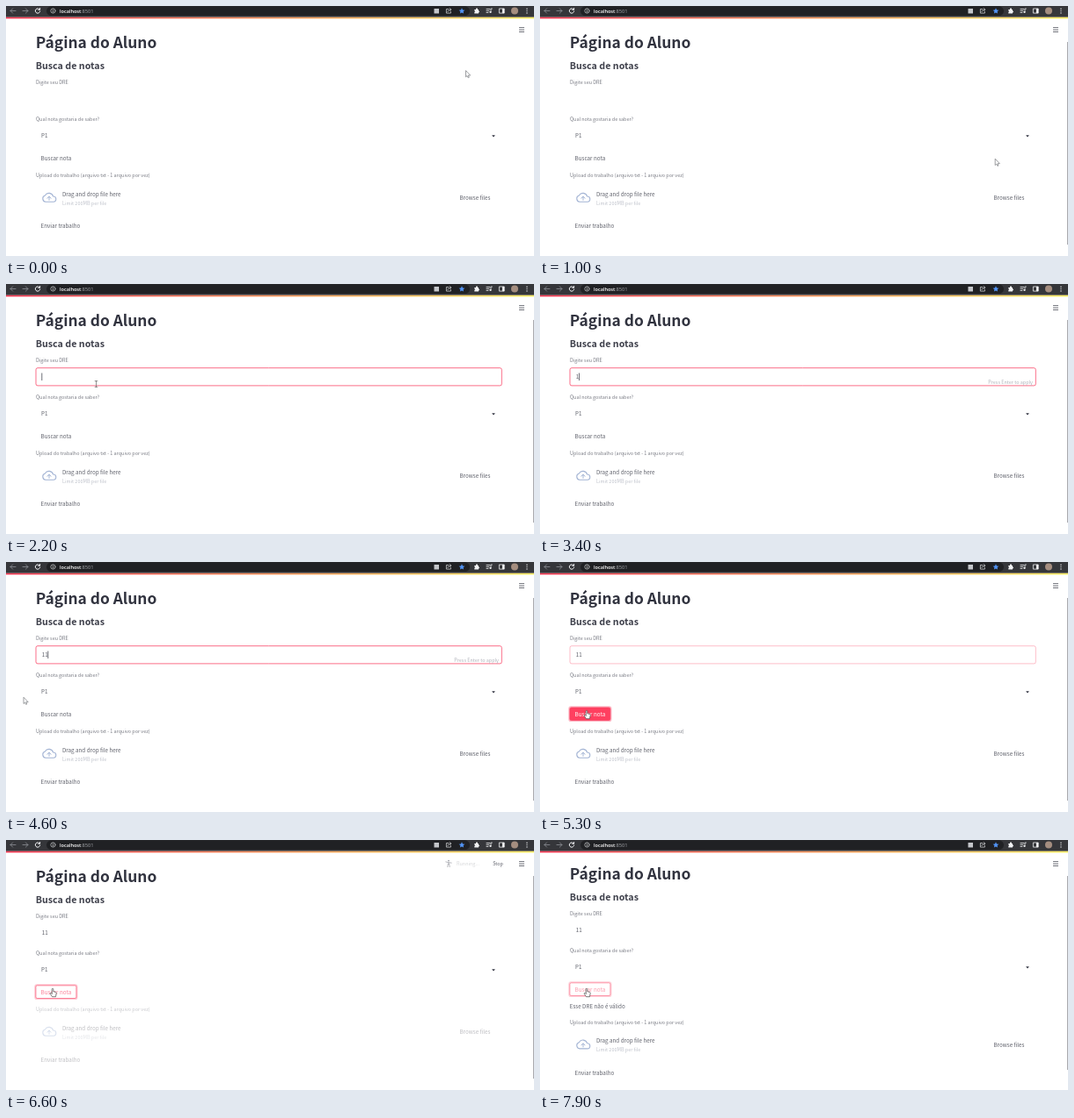
An HTML page with a canvas for the animation above (8000 ms loop, 600 by 285 pixels).

```html
<!DOCTYPE html>
<html lang="pt">
<head>
<meta charset="utf-8">
<title>Página do Aluno</title>
<style>
html, body { margin: 0; width: 100%; height: 100%; overflow: hidden; background: #fff; }
canvas { display: block; width: 600px; height: 285px; }
</style>
</head>
<body>
<canvas id="stage" width="600" height="285"></canvas>
<script>
const ctx = document.getElementById('stage').getContext('2d');
const LOOP = 8000, STEP = 100;
const ZOOM = 0.4375;          // page pixels to stage pixels
const EM = 1 / 1.117;         // the font's Latin letters are drawn large
const SANS = '"Noto Sans CJK JP", "Noto Sans CJK SC", "Noto Sans CJK", "Open Sans", sans-serif';
const BAR_FONT = '"Open Sans", "Noto Sans", sans-serif';
const INK = '#31333f', BODY = '#5d5f69', LABEL = '#787a83', RED = '#fa3e60';

// time, x, y
const PATH = [
  [0, 522.5, 74], [100, 524, 84], [500, 534, 172], [900, 534, 172],
  [1000, 517.2, 174.6], [1300, 250, 194], [1600, 24, 162], [1800, 45, 128],
  [2000, 95, 117], [2200, 102.5, 114], [3800, 102.5, 114], [4100, 102, 118],
  [4300, 102, 118], [4600, 20, 154.6], [4900, 34, 164], [5200, 53, 169.7]
];

const clamp = v => Math.max(0, Math.min(1, v));
const ramp = (t, from, to) => clamp((t - from) / (to - from));
const within = (t, from, to) => t >= from && t < to;

function text(str, x, y, size, color = BODY, weight = 400, family = SANS, em = EM) {
  ctx.save();
  ctx.translate(x, y);
  ctx.scale(ZOOM, ZOOM);
  ctx.font = `${weight} ${size * em}px ${family}`;
  ctx.fillStyle = color;
  ctx.fillText(str, 0, 0);
  ctx.restore();
}

function faded(alpha, draw) {
  ctx.save();
  ctx.globalAlpha *= alpha;
  draw();
  ctx.restore();
}

function rect(x, y, w, h, color) {
  ctx.fillStyle = color;
  ctx.fillRect(x, y, w, h);
}

function round(x, y, w, h, r) {
  ctx.beginPath();
  ctx.roundRect(x, y, w, h, r);
}

function dot(x, y, r, color) {
  ctx.beginPath();
  ctx.arc(x, y, r, 0, Math.PI * 2);
  ctx.fillStyle = color;
  ctx.fill();
}

function shape(d, x, y, fill, stroke, width = 0.8) {
  const p = new Path2D(d);
  ctx.save();
  ctx.translate(x, y);
  if (fill) { ctx.fillStyle = fill; ctx.fill(p); }
  if (stroke) {
    ctx.strokeStyle = stroke;
    ctx.lineWidth = width;
    ctx.lineJoin = ctx.lineCap = 'round';
    ctx.stroke(p);
  }
  ctx.restore();
}

function toolbar() {
  const light = '#f0f1f3', dim = '#8d9096';
  const g = ctx.createLinearGradient(0, 0, 600, 0);
  g.addColorStop(0, '#f6334f');
  g.addColorStop(1, '#fbec5c');
  rect(0, 12.5, 600, 1.9, g);

  rect(0, 0, 600, 12.6, '#35363a');
  round(46, 0.3, 481, 10.8, 5.4);
  ctx.fillStyle = '#202124';
  ctx.fill();
  shape('M3 0H-3M-0.4 -2.6L-3 0L-0.4 2.6', 8, 5.5, null, dim);
  shape('M-3 0H3M0.4 -2.6L3 0L0.4 2.6', 22, 5.5, null, dim);
  shape('M2.2 -1.6A2.7 2.7 0 1 0 2.7 0.6M2.6 -3V-1.2H0.8', 36, 5.5, null, light, 1);
  shape('M2.6 0A2.6 2.6 0 1 1 -2.6 0A2.6 2.6 0 1 1 2.6 0M0 -0.2V1.3M0 -1.4V-1.3', 53.5, 5.5, null, light, 0.6);
  text('localhost', 61, 7.7, 12.7, '#fff', 600, BAR_FONT, 1);
  text(':8501', 85, 7.7, 13.1, '#a4a7ac', 400, BAR_FONT, 1);
  rect(486.5, 3, 5.5, 5.5, '#c4c6ca');
  shape('M-0.5 -2H-2.6V2.6H2.4V1M-1 0.8C-0.8 -1 0.8 -1.4 2.6 -1.4M1.2 -3L2.8 -1.4L1.2 0.2', 503, 5.5, null, light, 0.65);
  shape('M0 -3.4L1 -1.1L3.4 -0.9L1.6 0.7L2.1 3L0 1.8L-2.1 3L-1.6 0.7L-3.4 -0.9L-1 -1.1Z', 518, 5.6, '#5294f5');
  shape('M-2.7 -1.6H-0.9A1 1 0 1 1 0.9 -1.6H2V0A1 1 0 1 1 2 2V3H-2.7V1.6A1 1 0 0 0 -2.7 -0.2Z', 535, 5.5, light);
  shape('M-3 -2H1M-3 0H0M-3 2H-1M2 1.4V-2.4H3.4', 549, 5.5, null, light);
  dot(550.5, 7, 1.1, light);
  shape('M-2.7 -2.5H2.7V2.6H-2.7Z', 563.5, 5.5, null, light);
  rect(564, 3, 2.2, 5.1, light);
  dot(578, 5.6, 4, '#a58e80');
  for (const y of [3.2, 5.6, 8]) dot(592, y, 0.7, light);
}

function field(t) {
  const glow = t < 5300 ? ramp(t, 1900, 2100) : 0.45 * (1 - ramp(t, 5300, 5600));
  if (glow) faded(glow, () => {
    round(34, 95.7, 529.3, 20.2, 2);
    ctx.strokeStyle = RED;
    ctx.lineWidth = 0.75;
    ctx.stroke();
  });
  const typed = '11'.slice(0, t < 3300 ? 0 : t < 3500 ? 1 : 2);
  text(typed, 40.7, 107.8, 16);
  const since = t < 3300 ? t - 2100 : t - 3500;
  const blinkOn = within(t, 3300, 3500) || Math.floor(since / 530) % 2 === 0;
  if (within(t, 2100, 5300) && blinkOn) rect(40.5 + typed.length * 3.5, 101.5, 0.7, 8.5, INK);
  if (within(t, 3300, 5300)) text('Press Enter to apply', 509.3, 113.7, 14, '#b0b2ba');
}

function button(t) {
  const pressed = within(t, 5300, 5500), hover = t >= 5100;
  const soft = t < 5500 ? 1 : 0.8 - 0.15 * ramp(t, 7300, 7700);
  if (hover) faded(soft, () => {
    if (t >= 5300) {
      round(33.2, 165.2, 47.4, 16, 2);
      ctx.strokeStyle = 'rgba(250,62,96,0.35)';
      ctx.lineWidth = 1.8;
      ctx.stroke();
    }
    round(33.9, 165.9, 46, 14.6, 1.6);
    if (pressed) { ctx.fillStyle = '#ff4060'; ctx.fill(); }
    ctx.strokeStyle = RED;
    ctx.lineWidth = 0.7;
    ctx.stroke();
  });
  faded(soft, () => text('Buscar nota', 39.6, 175.8, 16, pressed ? '#fff' : hover ? '#fa5f7c' : BODY));
}

function upload() {
  text('Upload do trabalho (arquivo txt - 1 arquivo por vez)', 34, 195.2, 14, LABEL);
  const blue = '#a3b4d4';
  shape('M-4 5.2A3.7 3.7 0 0 1 -4.6 -2A5 5 0 0 1 4.6 -1A3.1 3.1 0 0 1 4.8 5.2Z', 49, 218, null, blue, 1.1);
  shape('M0 3V-0.5M-2 1L0 -1.2L2 1', 49, 218.2, null, blue, 1);
  text('Drag and drop file here', 64, 216.5, 16);
  text('Limit 200MB per file', 64, 226.6, 14, '#bfc2cb');
  text('Browse files', 515.5, 221.2, 16);
  text('Enviar trabalho', 39.6, 253.2, 16);
}

function status(t) {
  if (!within(t, 5500, 7400)) return;
  const swing = Math.floor(t / 200) % 2 ? 1 : -1;
  const grey = '#a0a2a9';
  dot(503, 23.6, 0.95, grey);
  shape(`M-3.2 ${-1 - swing * 0.6}L0 -0.8L3.2 ${-1 + swing * 0.6}M0 -0.8V1.2M-1.2 4.2L-0.7 0.8H0.7L1.2 4.2`, 503, 26.5, null, grey, 0.75);
  faded(0.1 + 0.15 * ramp(t, 5800, 6600), () => text('Running...', 512, 29.2, 14));
  text('Stop', 553.2, 29.2, 14);
}

function cursor(t) {
  if (within(t, 3300, 3900)) return;
  let i = 1;
  while (i < PATH.length - 1 && PATH[i][0] < t) i++;
  const [t0, x0, y0] = PATH[i - 1], [t1, x1, y1] = PATH[i];
  const k = ramp(t, t0, t1);
  const x = x0 + (x1 - x0) * k, y = y0 + (y1 - y0) * k;
  if (within(t, 2000, 4400)) {
    shape('M-1.4 -3.4H1.4M0 -3.4V3.4M-1.4 3.4H1.4', x, y, null, '#666', 0.7);
  } else if (t >= 5100) {
    shape('M-0.9 0.3C-0.9 -0.8 0.8 -0.8 0.8 0.3V3L3.6 3.7Q4.4 4 4.2 5L3.5 9H-0.5L-2.8 5.5C-3 4.6 -2 4.3 -0.9 5.4Z',
      x, y, '#fff', '#444', 0.7);
  } else {
    shape('M0 0V6.9L1.6 5.5L2.7 7.8L3.8 7.3L2.8 5.1H4.8Z', x, y, '#fff', '#6a6c72', 0.65);
  }
}

function render(t) {
  const done = t >= 7400;
  rect(0, 0, 600, 285, '#fff');

  ctx.save();
  ctx.translate(0, done ? -3 : 0);
  text('Página do Aluno', 33.7, 48, 44.3, INK, 700);
  text('Busca de notas', 33.7, 72.2, 27.3, '#3f414c', 600);
  text('Digite seu DRE', 34, 88.8, 14, LABEL);
  field(t);
  text('Qual nota gostaria de saber?', 34, 130.8, 14, LABEL);
  text('P1', 40, 150.4, 16);
  shape('M-1.9 -0.9H1.9L0 1.2Z', 554, 148.2, INK);
  button(t);
  ctx.restore();

  if (done) text('Esse DRE não é válido', 33.7, 192.4, 16);
  const stale = done ? 0.5 + 0.5 * ramp(t, 7300, 7700) : 1 - 0.67 * ramp(t, 5800, 6700);
  ctx.save();
  ctx.translate(0, done ? 14.7 : 0);
  faded(stale, upload);
  ctx.restore();

  status(t);
  for (const y of [24.3, 26.7, 29.1]) rect(583, y, 6, 0.8, '#4b4d57');
  if (t >= 200) rect(599, 41, 1, done ? 221 : 231, '#a9a9ad');
  toolbar();
  cursor(t);
}

function tick() {
  const t = performance.now() % LOOP;
  render(Math.floor(t / STEP) * STEP);
  requestAnimationFrame(tick);
}
tick();
</script>
</body>
</html>
```
